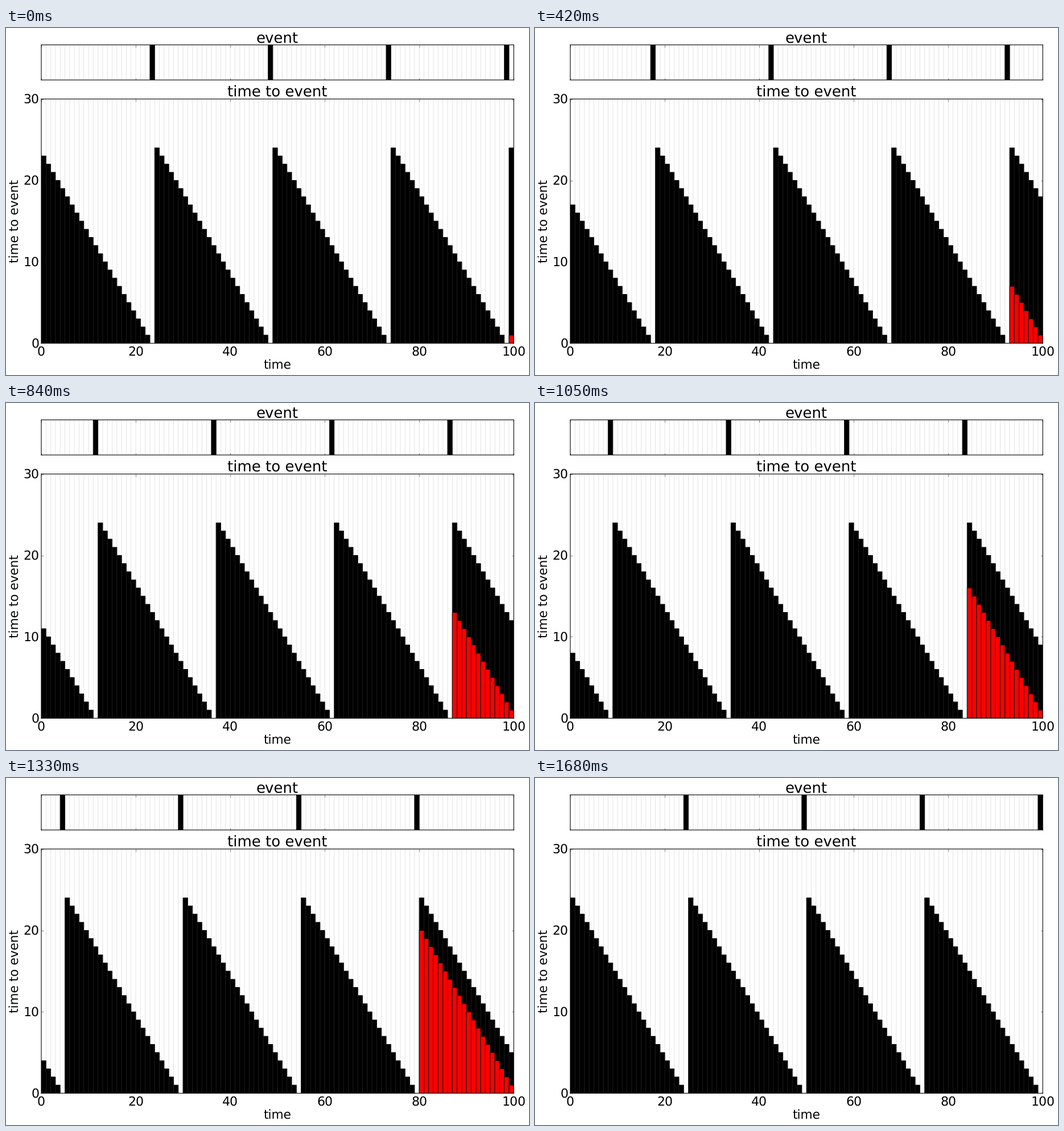
A matplotlib script that plays this animation: 919x609 px, repeating every 1.75 s.

```python
import numpy as np
import matplotlib.pyplot as plt
from matplotlib.animation import FuncAnimation

W, H, DPI = 919, 609, 64
PX = 72 / DPI  # points per pixel
LEFT, RIGHT = 62, 892.2
TOP, BOTTOM = 124.6, 553.3
SPAN, PERIOD, FRAMES = 100, 25, 25

plt.rcParams["font.family"] = "DejaVu Sans"
plt.rcParams["text.hinting"] = "none"
fig = plt.figure(figsize=(W / DPI, H / DPI), dpi=DPI, facecolor="white")
steps = np.arange(SPAN)


def panel(top, bottom, ymax, yticks):
    ax = fig.add_axes([LEFT / W, 1 - bottom / H, (RIGHT - LEFT) / W, (bottom - top) / H])
    ax.set(xlim=(0, SPAN), ylim=(0, ymax), xticks=range(0, SPAN + 1, 20), yticks=yticks)
    ax.tick_params(direction="in", top=True, right=True, length=3.5 * PX,
                   width=0.5 * PX, labelbottom=False, labelleft=False)
    for spine in ax.spines.values():
        spine.set(linewidth=1.1 * PX, snap=False)
    ax.vlines(range(1, SPAN), 0, ymax, color="gray", alpha=0.22, lw=PX,
              zorder=2.2, snap=False)
    return ax


def bars(ax, color):
    return ax.bar(steps, np.zeros(SPAN), width=1, align="edge", color=color,
                  edgecolor="black", linewidth=PX, snap=False)


def label(x, y, text, size, ha="center", **kw):
    """Place text with its baseline at pixel (x, y), y counted from the top."""
    fig.text(x / W, 1 - y / H, text, size=size * PX, ha=ha, va="baseline", **kw)


event_ax = panel(29.6, 91.2, 1, [])
wait_ax = panel(TOP, BOTTOM, 30, range(0, 31, 10))

event_bars = bars(event_ax, "black")
wait_bars = bars(wait_ax, "black")
tail_bars = bars(wait_ax, "red")

middle = (LEFT + RIGHT) / 2
label(middle, 25.5, "event", 26)
label(middle, 121, "time to event", 26)
label(middle, 599, "time", 21.6)
label(23, (TOP + BOTTOM) / 2, "time to event", 21.6, rotation=90, rotation_mode="anchor")
for t in range(0, SPAN + 1, 20):
    label(LEFT + (RIGHT - LEFT) * t / SPAN, 574.5, str(t), 22)
for v in range(0, 31, 10):
    label(58.5, BOTTOM - (BOTTOM - TOP) * v / 30 + 7, str(v), 22, ha="right")


def set_heights(group, heights):
    for bar, h in zip(group, heights):
        bar.set_height(h)
        bar.set_visible(h > 0)


def update(frame):
    wait = (PERIOD - 2 - frame - steps) % PERIOD
    last = steps[wait == 0].max()
    set_heights(event_bars, wait == 0)
    set_heights(wait_bars, wait)
    set_heights(tail_bars, np.where(steps > last, SPAN - steps, 0))
    return [*event_bars, *wait_bars, *tail_bars]


anim = FuncAnimation(fig, update, frames=FRAMES, interval=70, repeat=True,
                     repeat_delay=0, blit=False)
plt.show()
```
